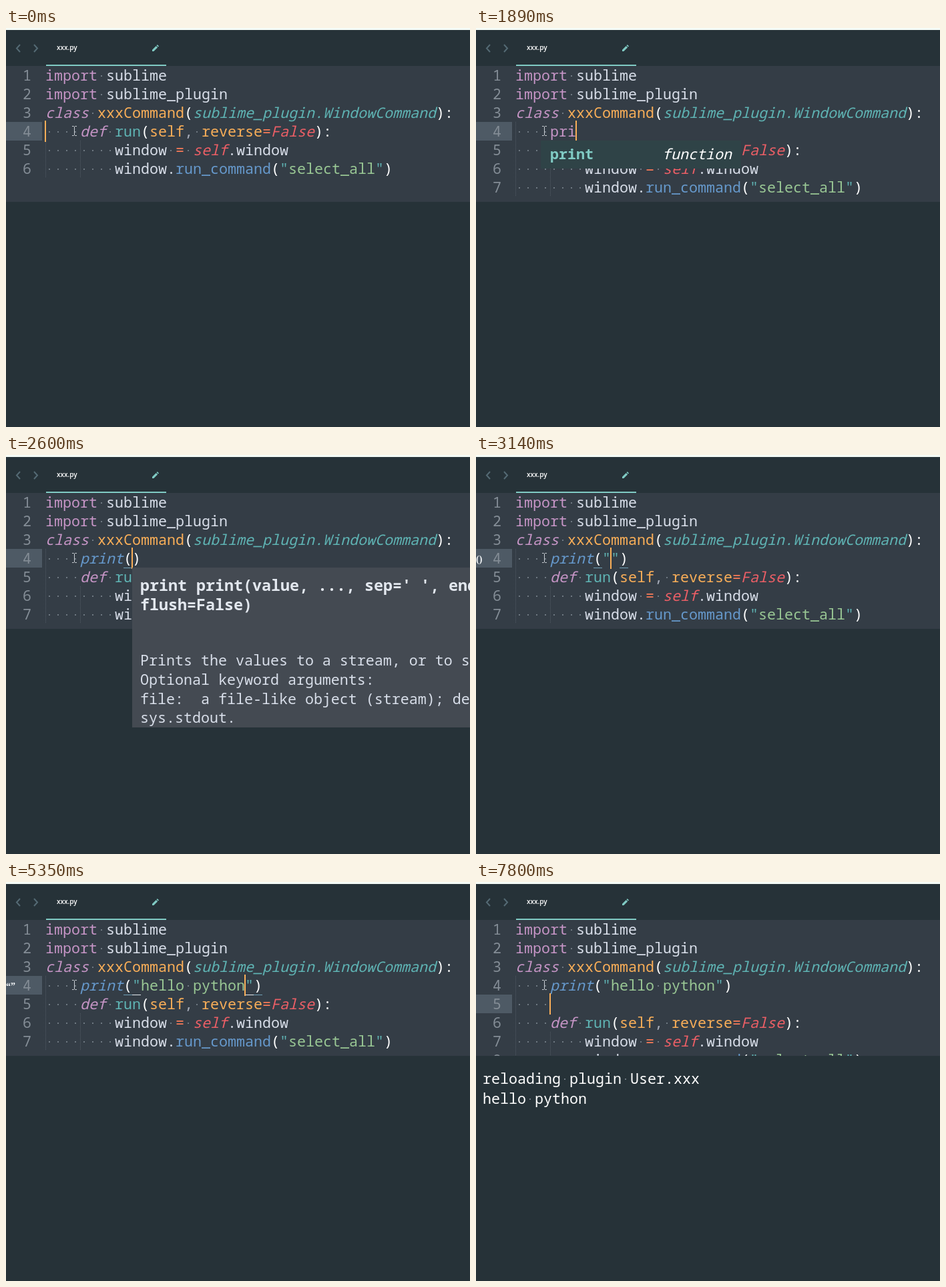
An HTML page with a canvas that plays this animation: 695 px wide and 599 px high, repeating every 8 s.

```html
<!DOCTYPE html>
<html lang="en">
<head>
<meta charset="utf-8">
<title>Editor typing</title>
<style>
  html, body { margin: 0; width: 100%; height: 100%; overflow: hidden; background: #263238; }
  canvas { display: block; }
</style>
</head>
<body>
<canvas id="stage" width="695" height="599"></canvas>
<script>
const ctx = document.getElementById('stage').getContext('2d');
const LOOP = 8000, CW = 13, LH = 28, LEFT = 59, TOP = 57;
const MONO = '"Noto Sans Mono", "DejaVu Sans Mono", monospace';
const SIZE = 21.67, BIG = 23.33;

// Style letter -> colour; a capital letter means italic.
const COLORS = {
  p: '#c695c6', w: '#d8dee9', o: '#f9ae58', f: '#ffffff', t: '#5fb4b4',
  g: '#99c794', b: '#6699cc', r: '#ec5f66', e: '#f97b58', d: '#a6acb9',
  n: '#848d96', a: '#80cbc4'
};
const HEAD = [
  'pimport|w sublime',
  'pimport|w sublime_plugin',
  'Pclass|o xxxCommand|f(|Tsublime_plugin|T.|TWindowCommand|f):'
];
const TAIL = [
  'w    |Pdef|t run|f(|oself|d,|o reverse|e=|RFalse|f):',
  'w        window|e =|R self|w.window',
  'w        window|w.|brun_command|f(|t"|gselect_all|t"|f)'
];
const DOCS = [
  [196, "print print(value, ..., sep=' ', end='\\n', file=sys.stdout,", true],
  [225, 'flush=False)', true],
  [308, 'Prints the values to a stream, or to sys.stdout by default.'],
  [337, 'Optional keyword arguments:'],
  [366, 'file:  a file-like object (stream); defaults to the current'],
  [394, 'sys.stdout.']
];
const BUILTINS = [['print', 'function'], ['property', 'class']];
const WORDS = [['print', ''], ['import', ''], ['sublime_plugin', '']];

const word = (s, more) => ({ mid: ['w    |p' + s], col: 4 + s.length, on: 1, ...more });
const call = (arg, more) => ({
  mid: ['w    |Bprint|f(|t"|g' + arg + '|t"|f)'], arg, col: 11 + arg.length, on: 1, ...more
});
const fade = (start, step) => [0.66, 0.33, 0].map((on, i) => [start + i * step, { on }]);

// Each step adds its changes to the state before it.
const STEPS = [
  [0, { mid: [], row: 4, col: 0, on: 1, dirty: true, items: [], arg: null }],
  ...fade(40, 90),
  [460, { mid: ['w'], row: 5, on: 1 }],
  [730, { row: 4 }],
  [1040, { mid: ['w    '], col: 4 }],
  ...fade(1400, 60),
  [1590, word('p')],
  [1650, { items: BUILTINS, listX: 97 }],
  [1710, word('pr')],
  [1850, word('pri', { items: BUILTINS.slice(0, 1) })],
  [1910, word('prin')],
  [1970, word('print')],
  [2030, { docs: 401 }],
  ...fade(2330, 65),
  [2520, { mid: ['w    |Bprint|f()'], col: 10, on: 1, parens: true, items: [] }],
  [2600, { docs: 189 }],
  ...fade(2880, 65),
  [3075, { icon: '()' }],
  [3140, call('', { docs: 0 })],
  [3490, { on: 0.66 }],
  [3590, { on: 0.33, icon: '“”', quotes: true }],
  [3690, call('h')],
  [3790, call('he')],
  [3940, call('hel')],
  [4070, call('hell')],
  [4230, call('hello')],
  [4440, call('hello ')],
  [4540, call('hello p')],
  [4640, { items: WORDS, listX: 266 }],
  [4840, call('hello py', { items: [] })],
  [5020, call('hello pyt')],
  [5110, call('hello pyth')],
  [5200, call('hello pytho')],
  [5350, call('hello python')],
  ...fade(5710, 105),
  [6060, { dirty: false }],
  [6210, { log: true }],
  [6370, { on: 0.5 }],
  [6460, { on: 1 }],
  [6600, { col: 24 }],
  [6690, { quotes: false }],
  [7050, { col: 25 }],
  [7130, { icon: '()' }],
  ...fade(7210, 85),
  [7640, { mid: [call('hello python').mid[0], 'w    '], row: 5, col: 4, on: 1, dirty: true }],
  [7800, { icon: '', parens: false }]
];

function rect(color, x, y, w, h) {
  ctx.fillStyle = color;
  ctx.fillRect(x, y, w, h);
}

function text(str, x, y, color, font) {
  ctx.font = font;
  ctx.fillStyle = color;
  ctx.fillText(str, x, y);
}

function stroke(color, width, path) {
  ctx.strokeStyle = color;
  ctx.lineWidth = width;
  ctx.stroke(new Path2D(path));
}

// One line of styled runs, with visible spaces.
function code(line, x, base) {
  for (const run of line.split('|')) {
    const key = run[0].toLowerCase();
    const font = (key === run[0] ? '500 ' : 'italic 500 ') + SIZE + 'px ' + MONO;
    for (const c of run.slice(1)) {
      if (c === ' ') rect('#6f7982', x + 5, base - 8, 2, 2);
      else text(c, x, base, COLORS[key], font);
      x += CW;
    }
  }
}

function guide(x, from, to) {
  for (let y = TOP + LH * (from - 1); y < TOP + LH * to; y += 2) rect('#505963', x, y, 1, 1);
}

function tabBar(dirty) {
  rect('#263238', 0, 0, 695, 57);
  rect('#f4fbf7', 0, 0, 695, 3);
  stroke('#546a74', 2, 'M21 25l-5 5.5 5 5.5M42 25l5 5.5-5 5.5');
  text('xxx.py', 76, 33, '#ffffff', '600 10px "Open Sans", "Noto Sans", sans-serif');
  rect('#80cbc4', 60, 55, 180, 2);
  if (!dirty) return;
  ctx.fillStyle = '#80cbc4';
  ctx.fill(new Path2D('M219 35v-2.3l5.8-5.8 2.3 2.3-5.8 5.8zM225.5 26.2l1.2-1.2 2.3 2.3-1.2 1.2z'));
}

function editor(s) {
  rect('#343d46', 0, TOP, 695, 204);
  rect('#4e5a65', 0, TOP + LH * (s.row - 1), 54, LH);
  const lines = [...HEAD, ...s.mid, ...TAIL];
  guide(59, 4, lines.length);
  guide(111, lines.length - 1, lines.length);
  lines.forEach((line, i) => {
    const base = TOP + 22 + LH * i;
    code('n' + (i + 1), 25, base);
    code(line, LEFT, base);
  });

  const mark = (col, color) => rect(color, LEFT + CW * col, 169, CW, 1);
  const len = s.arg === null ? 0 : s.arg.length + 2;
  if (s.parens) [9, 10 + len].forEach(c => mark(c, '#6f9fb5'));
  if (s.quotes) [10, 9 + len].forEach(c => mark(c, '#e4e9ee'));
  if (s.icon) text(s.icon, 0, 161, '#f4f7f9', 'bold 14px "Liberation Serif", serif');

  ctx.globalAlpha = s.on;
  rect('#f9ae58', LEFT - 1 + CW * s.col, TOP - 2 + LH * (s.row - 1), 2, 32);
  ctx.globalAlpha = 1;
}

function consolePanel(log) {
  rect('#263238', 0, 261, 695, 338);
  if (!log) return;
  code('freloading plugin User.xxx', 10, 303);
  code('fhello python', 10, 333);
}

function completions(items, x) {
  items.forEach(([name, kind], i) => {
    const y = 169 + 42 * i;
    rect(i ? '#2b393f' : '#2f4347', x, y, 300, 42);
    text(name, x + 14, y + 28, i ? COLORS.w : COLORS.a, (i ? '' : 'bold ') + SIZE + 'px ' + MONO);
    text(kind, x + 286 - CW * kind.length, y + 28, '#ffffff', 'italic ' + SIZE + 'px ' + MONO);
  });
}

function docs(x) {
  if (!x) return;
  rect('#444a52', x, 169, 695 - x, 240);
  for (const [y, str, bold] of DOCS)
    text(str, x + 12, y + 8, bold ? '#e3e8ef' : COLORS.w,
      (bold ? 'bold ' + BIG : SIZE) + 'px ' + MONO);
}

function draw(now) {
  const t = now % LOOP;
  const s = Object.assign({}, ...STEPS.filter(([at]) => at <= t).map(step => step[1]));
  editor(s);
  consolePanel(s.log);
  tabBar(s.dirty);
  completions(s.items, s.listX);
  docs(s.docs);
  // Mouse pointer
  stroke('#c9ced3', 1, 'M99 147.5h2.5l1 1 1-1h2.5M102.5 148v13M99 161.5h2.5l1-1 1 1h2.5');
}

const start = performance.now();
function frame() {
  draw(performance.now() - start);
  requestAnimationFrame(frame);
}
frame();
</script>
</body>
</html>
```
